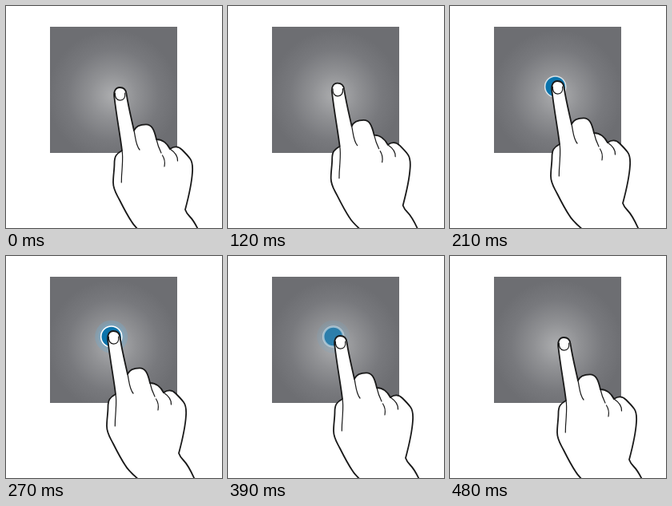
An HTML page that plays this animation: 270x278 px, repeating every 950 ms.

```html
<!DOCTYPE html>
<html lang="en">
<head>
<meta charset="utf-8">
<title>Tap gesture</title>
<style>
  html, body { margin: 0; width: 100%; height: 100%; overflow: hidden; background: #fff; }
  svg { display: block; width: 100%; height: 100%; }
  #hand { fill: none; stroke: #191919; stroke-width: 1.8; stroke-linecap: round; stroke-linejoin: round; }
  #hand .skin { fill: #fff; }
  #hand .fine { stroke-width: 1.2; }
</style>
</head>
<body>
<svg viewBox="0 0 270 278">
  <defs>
    <radialGradient id="shade" gradientUnits="userSpaceOnUse" cx="134" cy="112" r="82">
      <stop offset="0" stop-color="#adaeb0"/>
      <stop offset=".35" stop-color="#909194"/>
      <stop offset=".7" stop-color="#78797d"/>
      <stop offset="1" stop-color="#6d6e72"/>
    </radialGradient>
  </defs>

  <rect x="55" y="26" width="159" height="158" fill="url(#shade)"/>

  <g transform="translate(131.7 101)">
    <g id="glow" fill="#6fa9cc">
      <circle r="20.5" fill-opacity=".35"/>
      <circle r="16.5" fill-opacity=".35"/>
    </g>
    <g id="dot">
      <circle r="13" fill="#0b73ab"/>
      <circle id="ring" r="13" fill="none" stroke="#fff" stroke-width="1.6"/>
    </g>
  </g>

  <g id="hand">
    <path class="skin" d="M174 288 C166 281 161 277 157 270 C151 261 147 253 142 243
      C138 235 134 230 134 221 C134 212 135.500 205 135.500 197 C135.500 188 138 185 145 181
      C143 164 138 137 135.500 115 C134 107 137 102 142.200 102 C147 102 150 105 150.500 110
      C153 126 156 138 160 156 C162 151 168 148.300 175 148.300 C182 148.300 185 154 188 167
      C196 167 202 173 205 179 C211 175 216 176 220 180 C224 184 227 187 230 191
      C233 195 233.500 201 233 208 C232 224 228 240 224 255
      C225 258 227 261 230 264 C236 270 239 277 244 288"/>
    <path class="fine" d="M145 181 C146.500 188 145.300 200 145 206 Q144.300 213 144.300 221"/>
    <path class="fine" d="M160 156 C162 165 162 174 167 180"/>
    <path class="fine" d="M188 167 Q190 176 194 184 M195.500 187 Q199.500 193 198 201"/>
    <path class="fine" d="M205 179 C211 183 215 187 214.500 194"/>
    <path class="fine" d="M136.300 109 C136 114 138 118 142.500 118.200 C147 118 149.500 115 148.700 109"/>
  </g>
</svg>
<script>
  const LOOP = 950, STEP = 30, LAST = 480, REACH = 8;
  const $ = id => document.getElementById(id);

  // 0 before a, 1 after b, linear in between
  const ramp = (t, a, b) => Math.min(1, Math.max(0, (t - a) / (b - a)));

  function draw(now) {
    const t = Math.min(Math.floor((now % LOOP) / STEP) * STEP, LAST);
    const shift = -REACH * (ramp(t, 0, 180) - ramp(t, 270, 430));
    const fade = ramp(t, 300, 480);

    $('hand').setAttribute('transform', `translate(${shift} ${shift})`);
    $('dot').setAttribute('opacity', ramp(t, 150, 210) * (1 - fade * fade));
    $('ring').setAttribute('opacity', (0.5 + ramp(t, 150, 270) / 2) * (1 - 0.8 * fade));
    $('ring').setAttribute('stroke-width', 1.6 + 2 * fade);
    $('ring').setAttribute('r', 13 - fade);
    $('glow').setAttribute('opacity', ramp(t, 210, 270) * (1 - fade));
  }

  const start = performance.now();
  function tick() {
    draw(performance.now() - start);
    requestAnimationFrame(tick);
  }
  tick();
</script>
</body>
</html>
```
